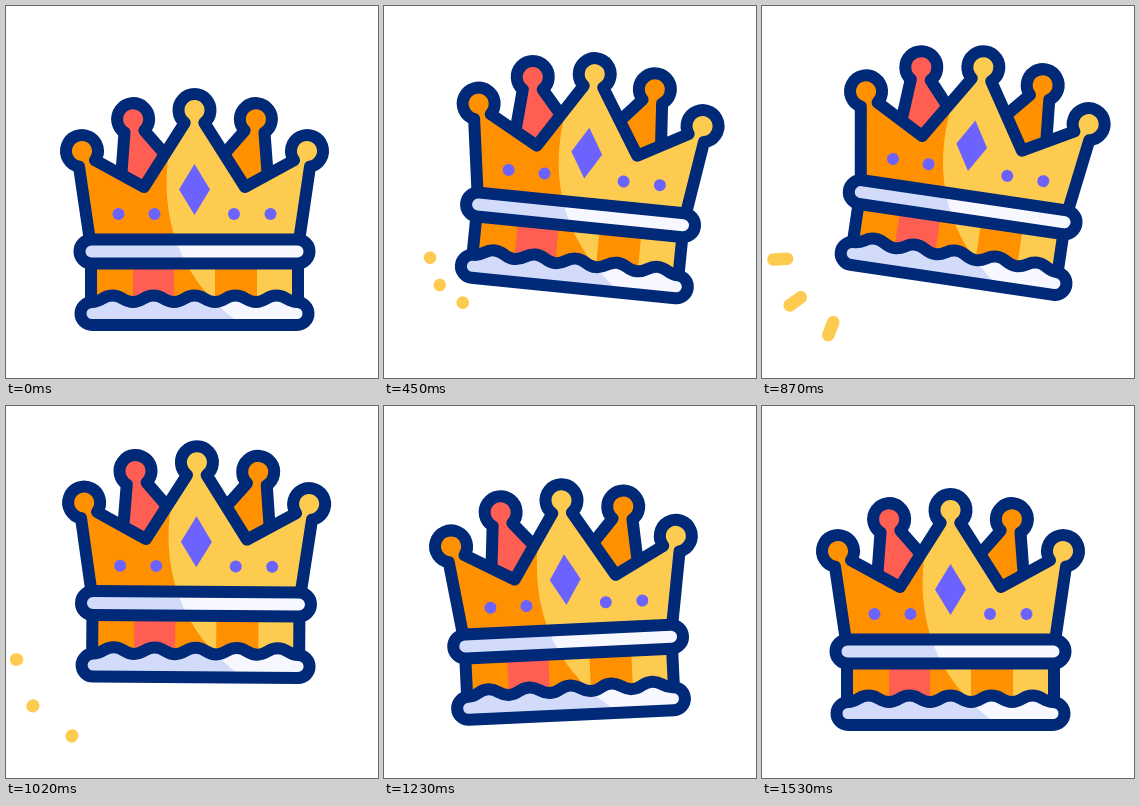
These frames come from a looping animation (372x372 px, 1.65 s). An HTML page:

```html
<!DOCTYPE html>
<html lang="en">
<head>
<meta charset="utf-8">
<title>Crown</title>
<style>
  html, body { margin: 0; width: 100%; height: 100%; overflow: hidden; background: #fff; }
  svg { display: block; width: 100vw; height: 100vh; }
  .line { fill: none; stroke: #002a78; stroke-width: 12; stroke-linejoin: round; }
  .spark { stroke: #fdcb50; stroke-width: 12.6; stroke-linecap: round; }
</style>
</head>
<body>
<svg viewBox="0 0 372 372">
  <g id="sparks"></g>
  <g id="crown"></g>
</svg>
<script>
const LOOP = 1650, STEP = 30;
const YELLOW = '#fdcb50', ORANGE = '#ff9100', RED = '#ff5e52';
const PALE = '#f7f8ff', LILAC = '#d3dbfb', VIOLET = '#6c63ff';
const BASE_X = 188.5, BASE_Y = 307;

// [time, value] keys, eased in and out between neighbours
const LIFT = [[60, 0], [480, 37.5], [870, 45], [980, 50.5], [1230, 10], [1440, 0]];
const TILT = [[60, 0], [180, -3], [480, 6], [870, 8.4], [1150, -6.1], [1360, 4.4], [1530, 0]];
const DRIFT = [[60, 0], [800, 3.5], [1250, -1.5], [1530, 0]];

const SHADE = 'M164 140C154 195 163 265 232 316V330H50V120H164Z';
const rect = (x, w, fill) =>
  `<rect x="${x}" y="250" width="${w}" height="50" fill="${fill}"/>`;
const gem = x => `<circle cx="${x}" cy="208" r="6" fill="${VIOLET}"/>`;
const mirror = svg => `<g transform="translate(${2 * BASE_X} 0) scale(-1 1)">${svg}</g>`;

let clips = 0;
function part(d, fill, shade, extra = '') {
  const id = 'clip' + clips++;
  const dark = shade ? `<path d="${SHADE}" fill="${shade}"/>` : '';
  return `<clipPath id="${id}"><path d="${d}"/></clipPath>
    <path d="${d}" fill="${fill}"/>
    <g clip-path="url(#${id})">${dark}${extra}</g>
    <path class="line" d="${d}"/>`;
}

const spike = 'M113 200L118.5 126.6A16 16 0 1 1 138.3 124.6L180 172V200Z';
const front = 'M85 242L73 160.7A16 16 0 1 1 89 154.3L138 181L178.7 116.7' +
  'A16 16 0 1 1 198.3 116.7L239 181L288 154.3A16 16 0 1 1 304 160.7L292 242Z';
const wave = 'c10 0 10.5 -6.5 20.5 -6.5s10.5 6.5 20.5 6.5'.repeat(5);
const hem = `M86 296${wave}A11.5 11.5 0 0 1 291 319H86A11.5 11.5 0 0 1 86 296Z`;
const band = 'M85.5 233.5H291.5a12 12 0 0 1 0 24H85.5a12 12 0 0 1 0 -24Z';

const crown = document.getElementById('crown');
crown.innerHTML =
  part(spike, RED) +
  mirror(part(spike, ORANGE)) +
  part('M85 250H292V300H85Z', YELLOW, ORANGE,
    rect(127, 41, RED) + rect(209, 42, ORANGE)) +
  part(front, YELLOW, ORANGE) +
  `<path d="M188.5 158L204 183.5L188.5 209L173 183.5Z" fill="${VIOLET}"/>` +
  [112.5, 148.5, 228, 264.5].map(gem).join('') +
  part(hem, PALE, LILAC) +
  part(band, PALE, LILAC);

const sparks = document.getElementById('sparks');
sparks.innerHTML = '<path class="spark"/>'.repeat(3);

const progress = (t, from, to) => Math.min(1, Math.max(0, (t - from) / (to - from)));
const smooth = u => u * u * (3 - 2 * u);
const cubic = u => u < 0.5 ? 4 * u ** 3 : 1 - 4 * (1 - u) ** 3;

// sum of the eased moves from key to key
function track(keys, t) {
  let value = keys[0][1];
  for (let i = 1; i < keys.length; i++) {
    const [t0, v0] = keys[i - 1], [t1, v1] = keys[i];
    value += (v1 - v0) * smooth(progress(t, t0, t1));
  }
  return value;
}

function drawCrown(t) {
  const x = BASE_X + track(DRIFT, t), y = BASE_Y - track(LIFT, t);
  crown.setAttribute('transform',
    `translate(${x} ${y}) rotate(${track(TILT, t)}) translate(${-BASE_X} ${-BASE_Y})`);
}

// three strokes fan out, then their tails catch up
function drawSparks(t) {
  const head = cubic(progress(t, 420, 990)), tail = cubic(progress(t, 600, 1110));
  sparks.style.display = t >= 420 && tail < 1 ? '' : 'none';
  [...sparks.children].forEach((spark, i) => {
    const angle = (111 + 33 * i) * Math.PI / 180;
    const at = u => {
      const r = 51 + 36 * u;
      return `${97 + r * Math.cos(angle)} ${249 + r * Math.sin(angle)}`;
    };
    spark.setAttribute('d', `M${at(tail)}L${at(head + 0.001)}`);
  });
}

const begin = performance.now();
function tick() {
  const now = (performance.now() - begin) % LOOP;
  const t = Math.floor(now / STEP) * STEP;
  drawCrown(t);
  drawSparks(t);
  requestAnimationFrame(tick);
}
tick();
</script>
</body>
</html>
```
